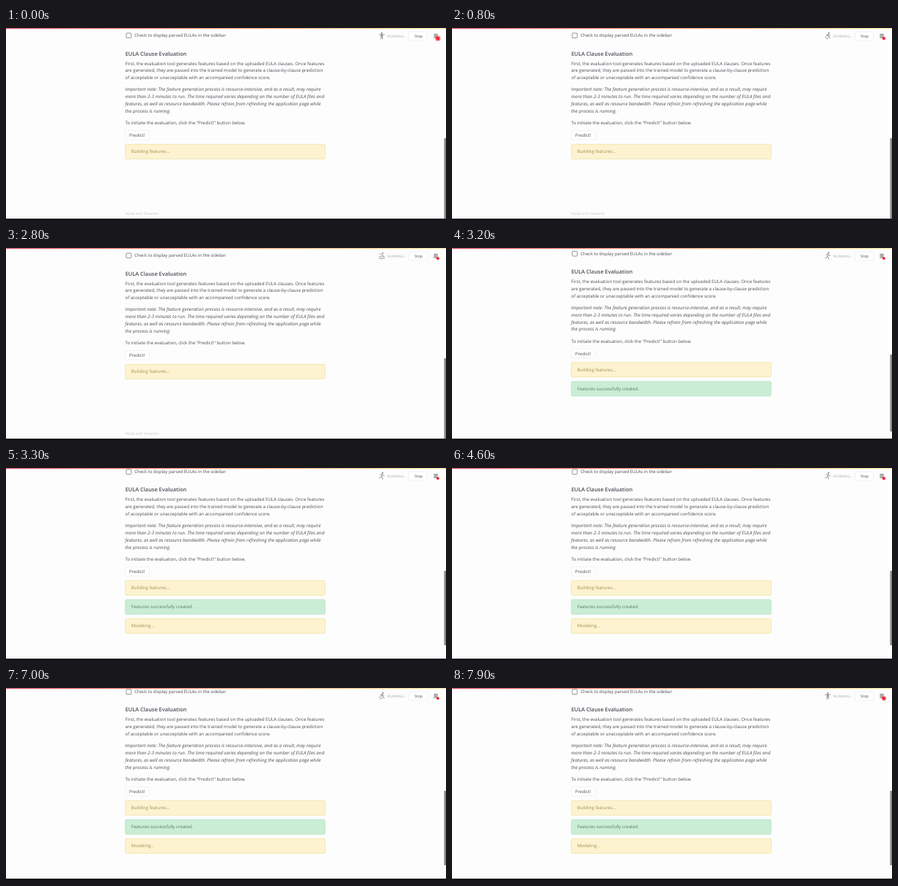
These frames come from a looping animation (600 by 263 pixels, 8 s). An HTML page:

```html
<!DOCTYPE html>
<html lang="en">
<head>
<meta charset="utf-8">
<title>EULA Clause Evaluation</title>
<style>
html, body { margin: 0; width: 100%; height: 100%; overflow: hidden; background: #fdfdfd; }
svg { display: block; width: 100vw; height: 100vh; font: 6.08px "Open Sans", "Noto Sans", sans-serif; fill: #4b4c56; text-rendering: geometricPrecision; }
.icon { fill: none; stroke: #8b8b91; stroke-width: .9; stroke-linecap: round; stroke-linejoin: round; }
.icon circle { fill: #8b8b91; stroke: none; }
</style>
</head>
<body>
<svg viewBox="0 0 600 263" preserveAspectRatio="none">
  <defs>
    <linearGradient id="bar">
      <stop offset="0" stop-color="#dc4a66"/>
      <stop offset=".5" stop-color="#f29a6c"/>
      <stop offset="1" stop-color="#f4e796"/>
    </linearGradient>
  </defs>
  <rect width="600" height="263" fill="#fdfdfd"/>
  <g id="page">
    <rect x="164" y="7" width="6.8" height="6.6" rx="1" fill="#fff" stroke="#77777f" stroke-width=".8"/>
    <text x="175.3" y="12.4" font-size="5.97">Check to display parsed EULAs in the sidebar</text>
    <text x="162.7" y="37.6" font-size="7.4" font-weight="600">EULA Clause Evaluation</text>
    <g id="copy"></g>
    <rect x="162.6" y="140.6" width="33" height="12.4" rx="1.5" fill="#fff" stroke="#e9e9ec" stroke-width=".6"/>
    <text x="168" y="149.1">Predict!</text>
    <g id="alerts"></g>
  </g>
  <text id="footer" x="162.6" y="256.3" font-size="4.9" fill="#c6c6cc">Made with Streamlit</text>
  <rect width="600" height="1.2" fill="url(#bar)"/>
  <g id="icons" class="icon"></g>
  <text x="520" y="13" font-size="4.8" fill="#a9a9b0">RUNNING...</text>
  <rect x="549.5" y="5.3" width="25" height="11.6" rx="1.5" fill="#fff" stroke="#e7e7ea" stroke-width=".6"/>
  <text x="557" y="13" font-size="5.2">Stop</text>
  <path d="M583.4 8.8h5.4M583.4 10.9h5.4M583.4 13h5.4" stroke="#55565f" stroke-width="1"/>
  <circle id="glow" cx="588.9" cy="14.2" fill="#ff3b48" opacity=".45"/>
  <circle id="dot" cx="588.9" cy="14.2" fill="#f5202e"/>
  <rect id="thumb" x="597.4" width="2.6" fill="#8a8a8c"/>
  <rect y="261.2" width="600" height="1.8" fill="#0b0b0c"/>
</svg>
<script>
const LOOP = 8000, TICK = 100;
const $ = id => document.getElementById(id);

function add(parent, tag, attrs, text = '') {
  const el = document.createElementNS('http://www.w3.org/2000/svg', tag);
  for (const key in attrs) el.setAttribute(key, attrs[key]);
  el.textContent = text;
  return parent.appendChild(el);
}

function paragraph(y, lines, attrs = {}) {
  lines.forEach((line, i) => add($('copy'), 'text', { x: 162.6, y: y + i * 9.85, ...attrs }, line));
}

paragraph(50.6, [
  'First, the evaluation tool generates features based on the uploaded EULA clauses. Once features',
  'are generated, they are passed into the trained model to generate a clause-by-clause prediction',
  'of acceptable or unacceptable with an accompanied confidence score.'
]);
paragraph(86.4, [
  'Important note: The feature generation process is resource-intensive, and as a result, may require',
  'more than 2-3 minutes to run. The time required varies depending on the number of EULA files and',
  'features, as well as resource bandwidth. Please refrain from refreshing the application page while',
  'the process is running.'
], { 'font-style': 'italic', 'font-size': 6.26 });
paragraph(132.2, ['To initiate the evaluation, click the "Predict!" button below.']);

// Status boxes
const yellow = { fill: '#fdf3d0', stroke: '#f1e2a8', ink: '#a28e50' };
const green = { fill: '#caedd5', stroke: '#b8e2c6', ink: '#4d8062' };
const alerts = [
  ['Building features...', yellow],
  ['Features successfully created.', green],
  ['Modeling...', yellow]
].map(([label, { fill, stroke, ink }], i) => {
  const y = 159.3 + i * 26.1;
  const g = add($('alerts'), 'g', {});
  add(g, 'rect', { x: 162.7, y, width: 272.4, height: 20, rx: 1.5, fill, stroke, 'stroke-width': 0.8 });
  add(g, 'text', { x: 170.8, y: y + 12.1, fill: ink }, label);
  return g;
});

// Activity icons: head position and body strokes
const poses = {
  stand: [512.4, 6.9, 'M508.8 9h7.2M512.4 9v3M511.4 9v6M513.4 9v6'],
  swim: [513.6, 7.3, 'M509.4 7.8l2.2 1.4 3 1.6M508.8 12q1.2-1 2.4 0t2.4 0 2.6 0M508.8 14.4q1.2-1 2.4 0t2.4 0 2.6 0'],
  wheel: [513.9, 6.8, 'M513.2 8.5l-1.4 2.6h2.4l1.2 3M512.8 9.4l2.4.8M513.2 8.5l-2.4.8M510.4 10.9a2 2 0 1 0 2.8 2.4'],
  run: [513.5, 6.7, 'M510.2 9.6l1.3-1.3 1.6.4.9 1.6 1.7.1M512.9 8.8l-1.1 2.7 1.6 1.1-.1 2.6M511.8 11.6l-.9 1.5-1.8.5']
};
const icons = {};
for (const name in poses) {
  const [cx, cy, d] = poses[name];
  icons[name] = add($('icons'), 'g', {});
  add(icons[name], 'circle', { cx, cy, r: 1.1 });
  add(icons[name], 'path', { d });
}

const keys = { P: 'stand', S: 'swim', W: 'wheel', R: 'run' };
const order = 'PSWRPSWPSRPSWRPSWRPSWRP';
const changes = [0, 300, 600, 900, 1200, 1500, 1800, 2500, 2700, 3100, 3600, 4000,
  4300, 4600, 4900, 5200, 5500, 5800, 6100, 6400, 6900, 7300, 7600];

const show = (el, on) => el.setAttribute('display', on ? 'inline' : 'none');

function draw(time) {
  const t = Math.floor(time % LOOP / TICK) * TICK;

  // Each new status box nudges the page up and shortens the scroll thumb
  const stage = t < 3200 ? 0 : t < 3300 ? 1 : 2;
  $('page').setAttribute('transform', `translate(0 ${-2.55 * stage})`);
  alerts.forEach((el, i) => show(el, i <= stage));
  show($('footer'), stage === 0);
  $('thumb').setAttribute('y', 151 - 5.1 * stage);
  $('thumb').setAttribute('height', [110.2, 105.5, 102][stage]);

  const pose = keys[order[changes.filter(c => c <= t).length - 1]];
  for (const name in icons) show(icons[name], name === pose);

  const fade = Math.max(0, 1 - t % 1900 / 1000);
  $('dot').setAttribute('r', 1.7 + 0.8 * fade);
  $('glow').setAttribute('r', 2.1 + 1.8 * fade);
}

function loop() {
  draw(performance.now());
  requestAnimationFrame(loop);
}
loop();
</script>
</body>
</html>
```
